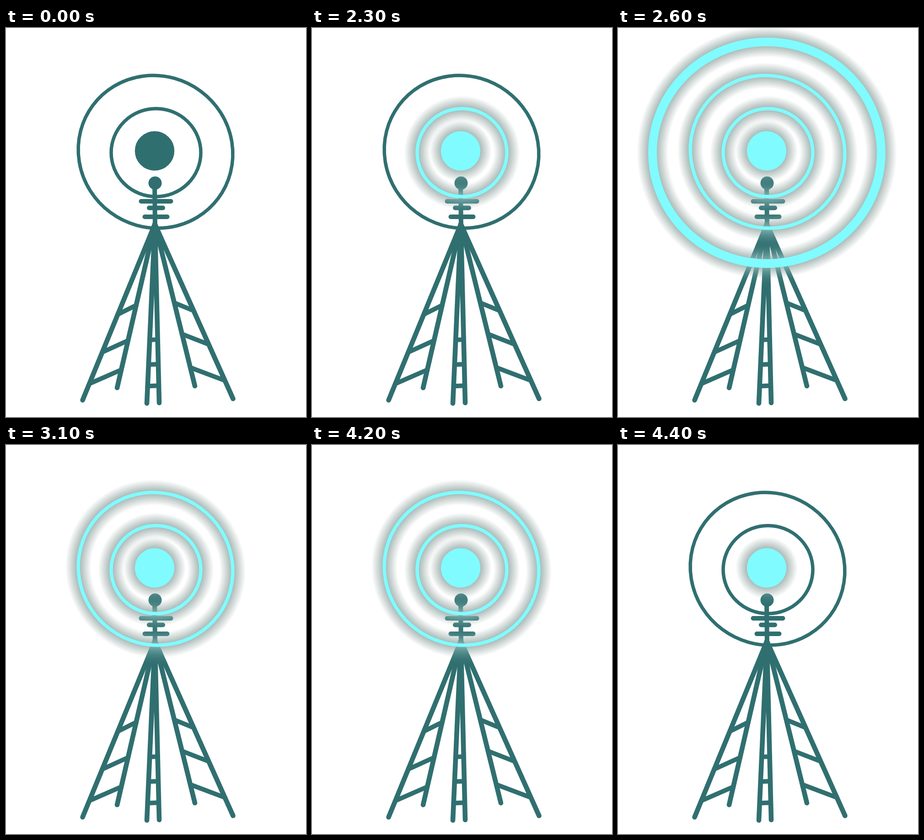
Recreate the animation shown at these times as an HTML page with a canvas. Size 656 by 853 pixels, loop 4.5 s.

```html
<!DOCTYPE html>
<html lang="en">
<head>
<meta charset="utf-8">
<title>Radio tower</title>
<style>
  html, body { margin: 0; width: 100%; height: 100%; overflow: hidden; background: #fff; }
  canvas { display: block; }
</style>
</head>
<body>
<canvas id="stage" width="656" height="853"></canvas>
<script>
const ctx = document.getElementById("stage").getContext("2d");
const LOOP = 4500;
const DARK = "#306f70", LIT = "#80fbff";
const HALO = { rgb: "118 143 138", strength: 0.6, reach: 25, power: 1, mode: "destination-over" };
const TINT = { rgb: "182 220 218", strength: 0.55, reach: 42, power: 2, mode: "source-atop" };
const APEX = { x: 325.5, y: 430 };

const ring = (x, y, rx, ry, width, tilt = 0) => ({ x, y, rx, ry, width, tilt });
const dot = ring(325, 269.5, 21.2, 21.2, 44);
const inner = ring(328, 273.3, 98, 96.5, 7.5);
const middle = ring(327, 271.5, 170.8, 165.6, 7.5, 0.64);
const outer = ring(325.5, 273.5, 250, 243, 19);
const outerShifted = { ...outer, x: 330, y: 268 };

// Rings light up from the centre, the newest one blinks off briefly, then they fade out inwards.
function litRings(time) {
  const passed = starts => starts.filter(start => time >= start).length;
  const blinking = [2200, 3100].some(start => time >= start && time < start + 100);
  const count = passed([2000, 2300, 2400, 2600]) - passed([4200, 4300, 4400]) - blinking;
  return [dot, inner, middle, time < 3200 ? outer : outerShifted].slice(0, count);
}

function strokeRing(r, color) {
  ctx.beginPath();
  ctx.ellipse(r.x, r.y, r.rx, r.ry, r.tilt, 0, 2 * Math.PI);
  ctx.strokeStyle = color;
  ctx.lineWidth = r.width;
  ctx.stroke();
}

function line(x1, y1, x2, y2, width) {
  ctx.beginPath();
  ctx.moveTo(x1, y1);
  ctx.lineTo(x2, y2);
  ctx.lineWidth = width;
  ctx.stroke();
}

// A soft band around the ring, drawn as a circular gradient squeezed to the ring's shape.
function glow(r, { rgb, strength, reach, power, mode }) {
  const half = r.width / 2;
  const start = Math.max(0, r.rx - half - reach), end = r.rx + half + reach;
  const gradient = ctx.createRadialGradient(0, 0, start, 0, 0, end);
  const stops = 40;
  for (let i = 0; i <= stops; i++) {
    const radius = start + (end - start) * i / stops;
    const distance = Math.max(0, Math.abs(radius - r.rx) - half);
    const alpha = strength * Math.max(0, 1 - distance / reach) ** power;
    gradient.addColorStop(i / stops, `rgb(${rgb} / ${alpha.toFixed(4)})`);
  }
  ctx.save();
  ctx.globalCompositeOperation = mode;
  ctx.translate(r.x, r.y);
  ctx.rotate(r.tilt);
  ctx.scale(1, r.ry / r.rx);
  ctx.fillStyle = gradient;
  ctx.beginPath();
  ctx.arc(0, 0, end, 0, 2 * Math.PI);
  ctx.fill();
  ctx.restore();
}

// Two rails from the apex, joined by rungs at fractions of their length.
function ladder(footA, footB, rungs, slant) {
  const along = ([x, y], part) => [APEX.x + (x - APEX.x) * part, APEX.y + (y - APEX.y) * part];
  for (const foot of [footA, footB]) line(APEX.x, APEX.y, ...foot, 10.6);
  for (const part of rungs) line(...along(footA, part), ...along(footB, part - slant), 10);
}

function drawTower() {
  ctx.lineCap = "round";
  ctx.strokeStyle = ctx.fillStyle = DARK;
  line(325, 340, 326, 440, 10);
  for (const [y, half] of [[380, 32.5], [394.5, 15], [414, 24.5]]) {
    line(328 - half, y, 328 + half, y, 10);
  }
  ladder([167.5, 816], [243, 789], [0.513, 0.728, 0.907], 0.017);
  ladder([308, 823], [335, 822], [0.646, 0.784, 0.904], 0);
  ladder([496.5, 813], [413, 785], [0.496, 0.689, 0.896], 0.01);
  ctx.beginPath();
  ctx.arc(326, 340, 14.5, 0, 2 * Math.PI);
  ctx.fill();
}

function draw(lit) {
  ctx.clearRect(0, 0, 656, 853);
  drawTower();
  for (const r of [dot, inner, middle]) {
    if (!lit.includes(r)) strokeRing(r, DARK);
  }
  for (const r of lit) glow(r, TINT);
  for (const r of lit) glow(r, HALO);
  for (const r of lit) strokeRing(r, LIT);
}

function tick() {
  draw(litRings(performance.now() % LOOP));
  requestAnimationFrame(tick);
}
tick();
</script>
</body>
</html>
```
